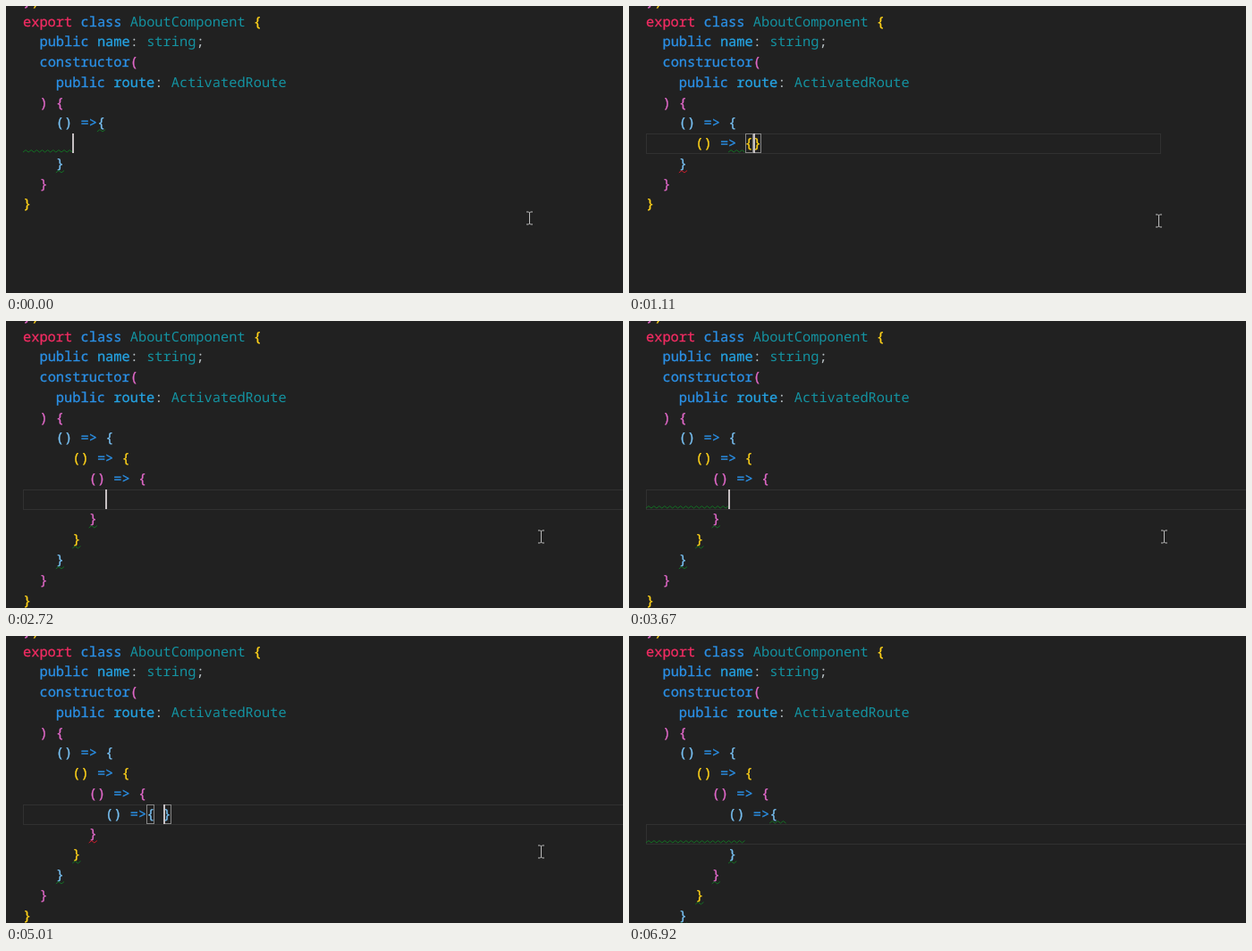
Recreate the animation shown at these times as an HTML page. Size 690 px wide and 322 px high, loop 7070 ms.

```html
<!DOCTYPE html>
<html lang="en">
<head>
<meta charset="utf-8">
<title>Typing nested arrow functions</title>
<style>
  html, body { margin: 0; width: 100%; height: 100%; overflow: hidden; background: #212121; }
  svg { display: block; }
  text {
    font: 15.35px "Noto Sans Mono", "DejaVu Sans Mono", monospace;
    white-space: pre;
    text-rendering: geometricPrecision;
    stroke-width: .3;
  }
  .export { fill: #f02c62; stroke: #f02c62; }
  .keyword { fill: #2b90e6; stroke: #2b90e6; }
  .type { fill: #1492a0; }
  .name { fill: #25a2e2; stroke: #25a2e2; }
  .mark { fill: #b4bcc0; }
  .b0 { fill: #ffd21a; stroke: #ffd21a; }
  .b1 { fill: #e068c8; stroke: #e068c8; }
  .b2 { fill: #78c0f2; stroke: #78c0f2; }
  .wave { fill: none; stroke: #127a24; stroke-width: .9; }
  .wave.error { stroke: #e01c2c; }
  .line { fill: none; stroke: #313131; }
  .pair { fill: none; stroke: #858585; }
  .caret { fill: #c6c0c2; }
  #pointer { fill: none; stroke: #bcbcbc; }
</style>
</head>
<body>
<svg width="690" height="322" viewBox="0 0 690 322">
  <g id="editor"></g>
  <path id="pointer" d="M-3.5-7h2.5L0-6L1-7h2.5M0-6V6M-3.5 7h2.5L0 6L1 7h2.5"/>
</svg>
<script>
const LOOP = 7070, LEFT = 19, CHAR = 9.21, ROW = 22.77, BASE = 23;
const HEAD = [
  'export class AboutComponent {',
  '  public name: string;',
  '  constructor(',
  '    public route: ActivatedRoute',
  '  ) {'
];

// [start, open blocks, current line, caret (-1 = blinked off), flags]
// flags: i indent, c closing braces, r first closing is an error,
//        o tight opener, a arrow spacing, m matched pair, n no line frame
const STEPS = [
  [0, 1, '', 0, 'icon'],
  [130, 1, '', 0, 'ic'],
  [560, 1, '()', 1, 'icm'],
  [700, 1, '()', 2, 'icm'],
  [830, 1, '() =', 4, 'r'],
  [970, 1, '() => ', 6, 'ra'],
  [1110, 1, '() => {}', 7, 'ram'],
  [1260, 2, '', 0, 'r'],
  [1390, 2, '', 0, 'ic'],
  [1670, 2, '()', 1, 'icm'],
  [1800, 2, '()', 2, 'icm'],
  [1930, 2, '() =>', 5, 'ic'],
  [2060, 2, '() => ', 6, 'ic'],
  [2180, 2, '() => {}', 7, 'icm'],
  [2570, 2, '() => {}', 7, 'rcm'],
  [2720, 3, '', 0, 'c'],
  [2850, 3, '', 0, 'ic'],
  [3250, 3, '', -1, 'ic'],
  [3670, 3, '', 0, 'ic'],
  [3930, 3, '()', 1, 'icm'],
  [4060, 3, '()', 2, 'icm'],
  [4200, 3, '() =', 4, 'c'],
  [4330, 3, '() =>', 5, 'rc'],
  [4590, 3, '() =>{}', 6, 'rcm'],
  [4730, 3, '() =>{ }', 7, 'rcm'],
  [5420, 4, '', 0, 'c'],
  [5560, 4, '', 0, 'ico'],
  [6260, 4, '', -1, 'ico'],
  [6640, 4, '', 0, 'ico'],
  [6920, 4, '', -1, 'ico']
];

// [start, x, y]
const POINTER = [
  [0, 585.5, 238], [130, 588, 240], [280, 589.5, 241], [700, 591, 241],
  [970, 592.5, 241], [1390, 593.5, 241], [1670, 595.5, 242], [2720, 598.5, 242],
  [5280, 600, 242], [5560, 602.5, 243], [6260, 608, 248], [6390, 624, 268],
  [6510, 646, 304], [6640, 660, 340]
];

const editor = document.getElementById('editor');
const pointer = document.getElementById('pointer');
const colX = col => LEFT + col * CHAR;
const rowY = row => Math.floor(BASE + row * ROW);
const pad = n => ' '.repeat(n);
const current = (list, t) => list.findLast(item => item[0] <= t);

function tokenClass(token) {
  if (token === 'export') return 'export';
  if (/^(class|public|constructor|=>|=)$/.test(token)) return 'keyword';
  if (/^([A-Z]|string)/.test(token)) return 'type';
  return /\w/.test(token) ? 'name' : 'mark';
}

// Brackets cycle through three colours by nesting depth.
function highlighter(depth) {
  const bracket = c => '({'.includes(c) ? depth++ : --depth;
  return line => line.replace(/\w+|=>|[^\s\w]/g, token => {
    const cls = /[(){}]/.test(token) ? 'b' + bracket(token) % 3 : tokenClass(token);
    return `<tspan class="${cls}">${token.replace('>', '&gt;')}</tspan>`;
  });
}

const textRow = (html, row) => `<text x="${LEFT}" y="${rowY(row)}">${html}</text>`;

function wave(row, col, length, error) {
  const width = length * CHAR, count = Math.round(width / 3), step = width / count;
  let d = `M${colX(col)} ${rowY(row) + 5}`;
  for (let i = 0; i < count; i++) d += `l${step} ${i % 2 ? 2.4 : -2.4}`;
  return `<path class="wave ${error ? 'error' : ''}" d="${d}"/>`;
}

const box = (cls, x, y, w, h) =>
  `<rect class="${cls}" x="${x}" y="${y}" width="${w}" height="${h}"/>`;

function draw([time, blocks, line, caret, flags]) {
  const has = flag => flags.includes(flag);
  const row = HEAD.length + blocks, indent = 4 + 2 * blocks;
  const top = rowY(row) - 16;
  const lines = [...HEAD];
  for (let i = 0; i < blocks; i++) {
    const tight = i === 3 || time < 130;
    lines.push(pad(4 + 2 * i) + (tight ? '() =>{' : '() => {'));
  }
  lines.push(pad(indent) + line);
  for (let i = blocks; i >= 0; i--) lines.push(pad(2 + 2 * i) + '}');
  lines.push('}');

  let html = '';
  if (!has('n')) html += box('line', LEFT + .5, top + .5, blocks < 2 ? 575 : 680, 22);
  html += textRow(highlighter(2)('})'), -1);
  const paint = highlighter(0);
  html += lines.map((text, i) => textRow(paint(text), i)).join('');

  if (has('i')) html += wave(row, 0, indent);
  if (has('o')) html += wave(row - 1, indent + 3, blocks > 3 ? 2 : 1);
  if (has('a')) html += wave(row, indent + 4, 2);
  if (has('c') || has('r')) {
    for (let i = 1; i <= blocks; i++) {
      const error = has('r') && i === 1;
      if (error || has('c')) html += wave(row + i, indent - 2 * i, 1, error);
    }
  }
  if (has('m')) {
    const pair = line.includes('{') ? '{}' : '()';
    for (const c of pair) {
      html += box('pair', Math.round(colX(indent + line.indexOf(c))) + .5, top + .5, 8, 21);
    }
  }
  if (caret >= 0) html += box('caret', Math.round(colX(indent + caret)), top, 2, 22);
  editor.innerHTML = html;
}

let shown;
function tick() {
  const t = performance.now() % LOOP;
  const step = current(STEPS, t);
  if (step !== shown) draw(shown = step);
  const [, x, y] = current(POINTER, t);
  pointer.setAttribute('transform', `translate(${x} ${y})`);
  requestAnimationFrame(tick);
}
tick();
</script>
</body>
</html>
```
